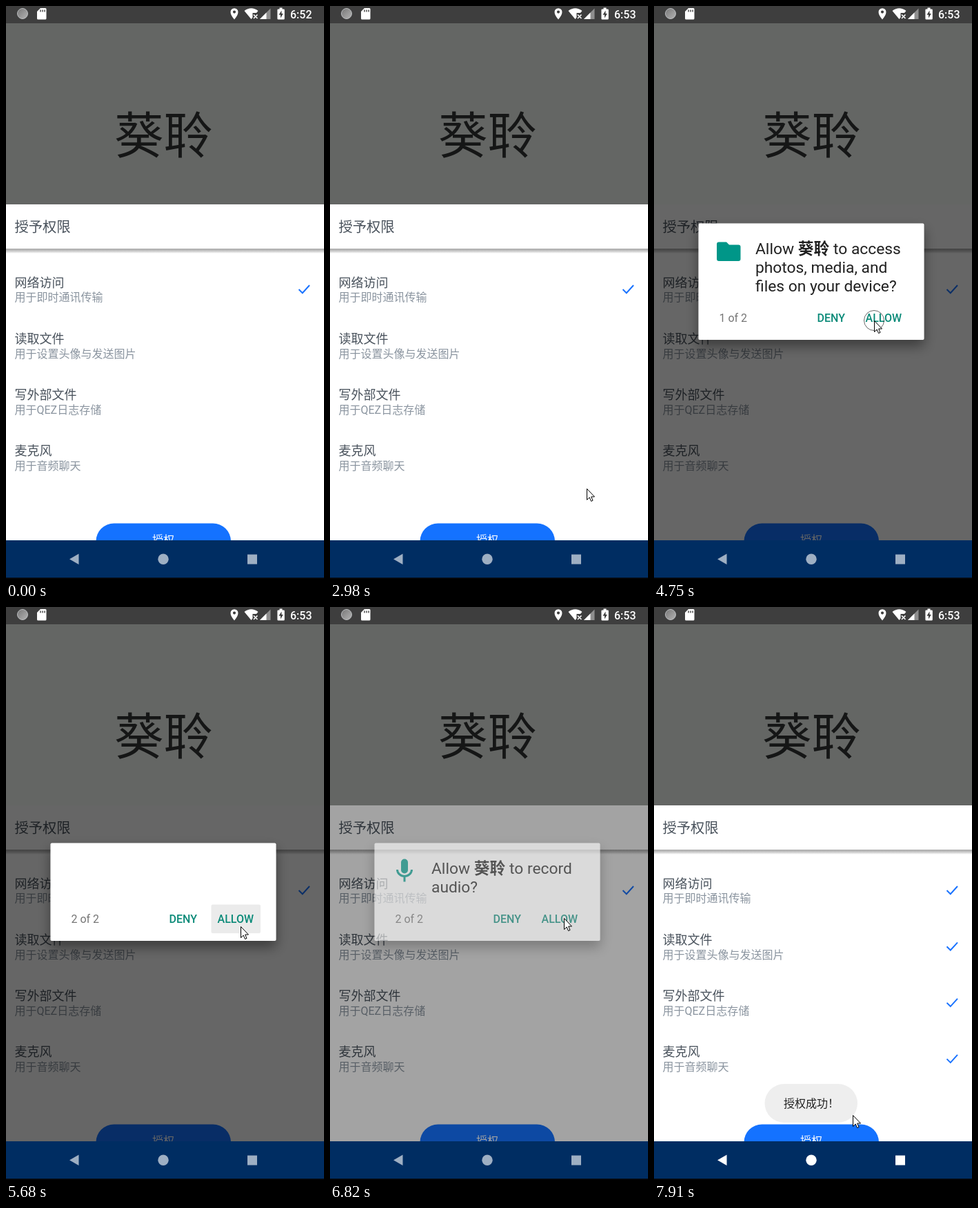
An HTML page for the animation above (7.99 s loop, 461x829 px).

```html
<!DOCTYPE html>
<html lang="zh-CN">
<head>
<meta charset="utf-8">
<title>授予权限</title>
<style>
  html, body { margin: 0; width: 100%; height: 100%; overflow: hidden; background: #fff; }
  svg { display: block; width: 461px; height: 829px; font-family: Roboto, "Noto Sans CJK SC", "Noto Sans CJK", sans-serif; }
  .name { font-size: 18px; fill: #49525c; }
  .note { font-size: 16px; fill: #8a949f; }
  .ask { font-size: 22.8px; fill: #212121; }
  .ask .app { font-weight: 700; }
  .act { font-size: 16px; font-weight: 500; fill: #0a8a78; }
  .tick { fill: none; stroke: #1a73ff; stroke-width: 2; }
</style>
</head>
<body>
<svg viewBox="0 0 461 829">
  <defs>
    <linearGradient id="edge" x1="0" y1="0" x2="0" y2="1">
      <stop offset="0" stop-color="#a8a8a8"/>
      <stop offset=".45" stop-color="#c4c4c4"/>
      <stop offset="1" stop-color="#fff"/>
    </linearGradient>
    <linearGradient id="ball" x1="0" y1="0" x2="1" y2="1">
      <stop offset="0" stop-color="#777"/>
      <stop offset="1" stop-color="#b4b4b4"/>
    </linearGradient>
    <filter id="lift" x="-20%" y="-20%" width="140%" height="150%">
      <feDropShadow dx="0" dy="9" stdDeviation="9" flood-color="#000" flood-opacity=".42"/>
    </filter>
    <clipPath id="page"><rect y="287" width="461" height="486"/></clipPath>
    <clipPath id="card"><rect id="cardClip" x="64.5" width="327"/></clipPath>
  </defs>

  <rect width="461" height="829" fill="#fff"/>
  <rect width="461" height="287" fill="#646664"/>
  <rect width="461" height="25" fill="#3e3e3e"/>
  <text x="157" y="212.5" font-size="71.5" font-weight="300" fill="#151616">葵聆</text>

  <g id="status" fill="#fff">
    <circle cx="24" cy="11" r="7.5" fill="url(#ball)" stroke="#b9bcbe"/>
    <path d="M50 3H57Q58.500 3 58.500 4.500V18Q58.500 19.500 57 19.500H46.500Q45 19.500 45 18V8Z"/>
    <path d="M50 5.500V8.500M53 5.500V8.500M56 5.500V8.500" stroke="#3e3e3e" stroke-width="1.400"/>
    <path d="M331 19.500C327.500 15 325.500 12 325.500 8.700A5.500 5.500 0 0 1 336.500 8.700C336.500 12 334.500 15 331 19.500ZM331 6.500A2 2 0 1 0 331 10.700A2 2 0 1 0 331 6.500Z" fill-rule="evenodd"/>
    <path d="M345.500 7Q355.500 -.5 365.500 7L363 10H357.500V16.500L355.500 19Z"/>
    <path d="M359 12.500L364.500 18M364.500 12.500L359 18" stroke="#fff" stroke-width="1.600"/>
    <path d="M368 19L383.500 3.500V19Z" fill="#8e8e8e"/>
    <path d="M368 19L377.500 9.500V19Z"/>
    <path d="M396.500 2.500H400.500V4.500H402.500Q403.800 4.500 403.800 5.800V18.200Q403.800 19.500 402.500 19.500H394.700Q393.400 19.500 393.400 18.200V5.800Q393.400 4.500 394.700 4.500H396.500Z"/>
    <path d="M399.500 6.500L395.500 12.800H398V17.500L401.800 11H399.500Z" fill="#3e3e3e"/>
    <text id="clock" x="412" y="17.500" font-size="16" font-weight="500"></text>
  </g>

  <text x="12.500" y="327" font-size="20.300" fill="#49525c">授予权限</text>
  <rect y="351" width="461" height="7" fill="url(#edge)"/>
  <g id="rows"></g>

  <g clip-path="url(#page)">
    <rect x="130.500" y="748.500" width="195.500" height="52" rx="26" fill="#1472ff"/>
    <rect id="glow" x="130.500" y="748.500" width="195.500" height="52" rx="26" fill="#fff"/>
    <text x="212" y="778" font-size="16" fill="#fff">授权</text>
  </g>
  <g id="toast">
    <rect x="160.500" y="690" width="134.500" height="56" rx="28" fill="#eee"/>
    <text id="toastText" x="188" y="724" font-size="16" fill="#222">授权成功！</text>
  </g>

  <rect id="dim" y="287" width="461" height="486"/>
  <rect y="773" width="461" height="56" fill="#002d62"/>
  <rect y="827" width="461" height="2" fill="#05070c"/>
  <g id="nav" fill="#fff">
    <path d="M92 800.300L105.500 792.500V808Z"/>
    <circle cx="228" cy="800.300" r="7.700"/>
    <rect x="350" y="793.500" width="14" height="14"/>
  </g>

  <g id="dialog">
    <rect id="cardBox" x="64.500" width="327" rx="2" fill="#fff" filter="url(#lift)"/>
    <g clip-path="url(#card)">
      <g id="askFiles">
        <path d="M94 341.500H105L109 345.500H122.500Q125.500 345.500 125.500 348.500V366Q125.500 369 122.500 369H94Q91 369 91 366V344.500Q91 341.500 94 341.500Z" fill="#009688"/>
        <text class="ask" x="147" y="359">Allow <tspan class="app">葵聆</tspan> to access</text>
        <text class="ask" x="147" y="386">photos, media, and</text>
        <text class="ask" x="147" y="412.500">files on your device?</text>
      </g>
      <g id="askAudio">
        <rect x="103" y="364.500" width="10" height="21" rx="5" fill="#009688"/>
        <path d="M97.500 380A10.500 9.500 0 0 0 118.500 380M108 389.500V397.500" fill="none" stroke="#009688" stroke-width="3"/>
        <text class="ask" x="147" y="386">Allow <tspan class="app">葵聆</tspan> to record</text>
        <text class="ask" x="147" y="412.500">audio?</text>
      </g>
      <rect id="pressed" x="297.500" y="430.500" width="71.500" height="41.500" rx="2" fill="#ebebeb"/>
      <text id="count" x="94.500" y="457" font-size="16" fill="#757575"></text>
      <text class="act" x="236.500" y="457">DENY</text>
      <text class="act" x="306.500" y="457">ALLOW</text>
    </g>
  </g>

  <circle id="ring" r="14.500" fill="none" stroke="#000" stroke-opacity=".6"/>
  <path id="cursor" d="M.5 .5V16.500L4.200 13L6.600 18.500L9 17.400L6.700 12H11.500Z" fill="#fff" stroke="#000"/>
</svg>
<script>
const LOOP = 7990;
const $ = id => document.getElementById(id);
const set = (id, attrs) => { for (const k in attrs) $(id).setAttribute(k, attrs[k]); };
const clamp = v => Math.max(0, Math.min(1, v));
const part = (t, a, b) => clamp((t - a) / (b - a));
const within = (t, a, b) => t >= a && t < b;

// Latest value of a list of [time, value] pairs
const hold = (t, first, list) => list.reduce((v, [at, next]) => t >= at ? next : v, first);

const rows = [
  ["网络访问", "用于即时通讯传输"],
  ["读取文件", "用于设置头像与发送图片"],
  ["写外部文件", "用于QEZ日志存储"],
  ["麦克风", "用于音频聊天"]
];
$("rows").innerHTML = rows.map(([name, note], i) =>
  `<g transform="translate(0 ${(i * 81.3).toFixed(1)})">
    <text class="name" x="12.500" y="406.500">${name}</text>
    <text class="note" x="12.500" y="427.300">${note}</text>
    <path class="tick" d="M424.500 410L429.800 415.200L440 404"/>
  </g>`).join("");
const lateTicks = [...document.querySelectorAll(".tick")].slice(1);

// Pointer moves: first step, last step, number of steps, end point
const START = [349, 788];
const moves = [
  [350, 660, 5, 280, 762], [810, 810, 1, 277, 763], [1120, 1350, 4, 296, 764],
  [1820, 2060, 4, 389, 655], [2600, 2980, 6, 372, 698], [3060, 3200, 3, 354, 715],
  [3360, 3510, 3, 315, 514], [3590, 3900, 5, 269, 460], [3980, 4150, 3, 286, 458],
  [4200, 4430, 4, 319, 455], [5300, 5680, 5, 340, 462], [5760, 5850, 2, 348, 449],
  [6000, 6380, 5, 339, 450], [7070, 7070, 1, 339, 454], [7450, 7910, 7, 288, 735]
];
const clicks = [[810, 890], [1580, 1670], [4750, 4920], [6530, 6610]];

function pointer(t) {
  let [x, y] = START;
  for (const [from, to, steps, ex, ey] of moves) {
    if (t < from) break;
    const gap = steps > 1 ? (to - from) / (steps - 1) : 1;
    const k = Math.min(steps, Math.floor((t - from) / gap + 1e-6) + 1) / steps;
    x += (ex - x) * k;
    y += (ey - y) * k;
  }
  return [Math.round(x), Math.round(y)];
}

function draw(t) {
  $("clock").textContent = t < 500 ? "6:52" : "6:53";
  set("glow", { opacity: hold(t, 0, [[1120, .08], [1200, .16], [1270, .08], [1350, 0],
    [1820, .08], [1900, .16], [1980, .12], [2060, .06], [2290, 0]]) });

  const shade = hold(t, 0, [[3060, .3], [3130, .75], [3200, 1], [6760, .6], [6830, .25], [6900, 0]]);
  set("dim", { opacity: shade * .6 });
  set("dialog", { opacity: shade });
  lateTicks.forEach(tick => tick.setAttribute("visibility", t >= 6830 ? "visible" : "hidden"));

  const top = 314.5 + 27 * part(t, 5530, 5650);
  const box = { y: top, height: 483 - top };
  set("cardBox", box);
  set("cardClip", box);

  const leave = part(t, 5380, 5530) ** 2;
  set("askFiles", { transform: `translate(${-330 * leave} 0)`, opacity: 1 - leave });
  const enter = 1 - (1 - part(t, 5960, 6300)) ** 2;
  set("askAudio", { transform: `translate(${22 * (1 - enter)} 0)`, opacity: enter });
  $("count").textContent = t < 5530 ? "1 of 2" : "2 of 2";
  set("pressed", { opacity: hold(t, 0, [[5300, .6], [5380, 1], [5760, .5], [5850, 0]]) });

  set("nav", { opacity: hold(t, .62, [[7070, .8], [7140, 1]]) });
  set("toast", { opacity: hold(t, 0, [[7070, .5], [7140, 1]]) });
  set("toastText", { opacity: t < 7450 ? .6 : 1 });

  const [x, y] = pointer(t);
  const shown = t >= 200 ? "visible" : "hidden";
  set("cursor", { transform: `translate(${x} ${y})`, visibility: shown });
  const down = clicks.some(([a, b]) => within(t, a, b));
  set("ring", { cx: x, cy: y, visibility: down ? "visible" : "hidden" });
}

const begin = performance.now();
function tick() {
  draw((performance.now() - begin) % LOOP);
  requestAnimationFrame(tick);
}
tick();
</script>
</body>
</html>
```
